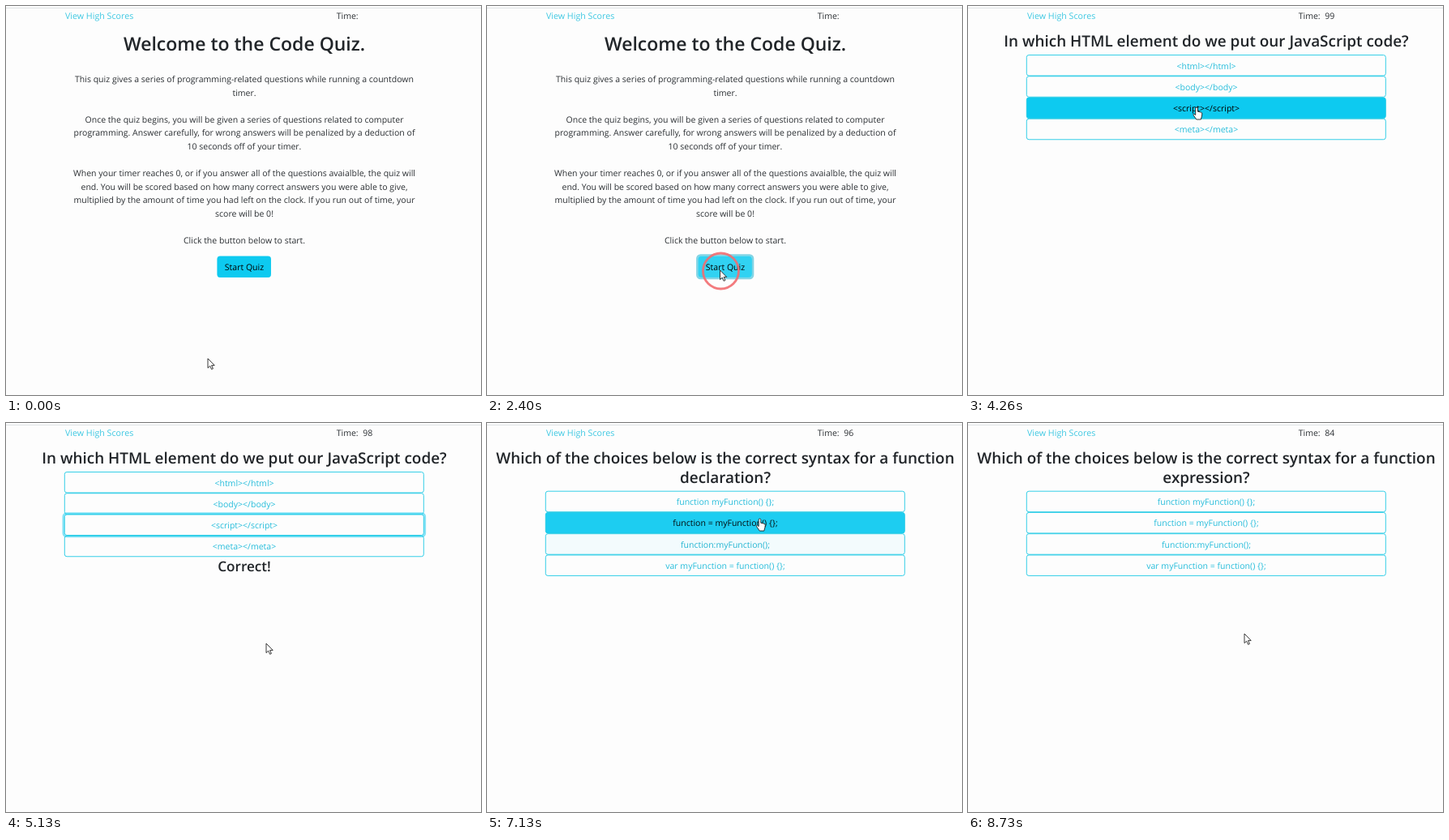
Write an HTML page that moves like this. It is 586 px wide and 480 px high and loops after 8.8 s.

```html
<!DOCTYPE html>
<html lang="en">
<head>
<meta charset="utf-8">
<title>Code Quiz</title>
<style>
  html, body { margin: 0; width: 100%; height: 100%; overflow: hidden; background: #fdfdfd; }
  svg { display: block; width: 586px; height: 480px; }
  text {
    font: 10.53px "Open Sans", "Noto Sans", sans-serif;
    fill: #2b2f33; text-anchor: middle; text-rendering: geometricPrecision;
  }
  .left { text-anchor: start; }
  .link { fill: #3fc8e2; font-size: 10.7px; }
  .title, .question, .result { font-weight: 600; fill: #212529; }
  .title { font-size: 23px; }
  .question { font-size: 18.93px; }
  .result { font-size: 17.1px; }
  .box { fill: #0dcaf0; stroke: #1fcae6; stroke-width: .9; }
  .ring { fill: none; stroke: #0dcaf0; stroke-opacity: .5; stroke-width: 2.6; }
  .cursor path { fill: #fff; stroke: #222; stroke-width: .9; stroke-linejoin: round; }
</style>
</head>
<body>
<svg id="stage" viewBox="0 0 586 480"></svg>
<script>
const LOOP = 8800, CENTER = 294, LINE = 16.6, ROW = 26.25, HEADING_LINE = 23.7, FADE = 150;
const START_AT = 2450, PENALTY_AT = 7530;

const intro = [
  [0, 'This quiz gives a series of programming-related questions while running a countdown'],
  [1, 'timer.'],
  [3, 'Once the quiz begins, you will be given a series of questions related to computer'],
  [4, 'programming. Answer carefully, for wrong answers will be penalized by a deduction of'],
  [5, '10 seconds off of your timer.'],
  [7, 'When your timer reaches 0, or if you answer all of the questions avaialble, the quiz will'],
  [8, 'end. You will be scored based on how many correct answers you were able to give,'],
  [9, 'multiplied by the amount of time you had left on the clock. If you run out of time, your'],
  [10, 'score will be 0!'],
  [12, 'Click the button below to start.'],
];

const syntaxChoices = ['function myFunction() {};', 'function = myFunction() {};',
  'function:myFunction();', 'var myFunction = function() {};'];
const syntaxHeading = 'Which of the choices below is the correct syntax for a function';

// hovers: [row, enter, leave]; focus: [row, time]; result: [text, time]
const questions = [
  { from: START_AT, to: 5400,
    heading: ['In which HTML element do we put our JavaScript code?'],
    choices: ['html', 'body', 'script', 'meta'].map(tag => `<${tag}></${tag}>`),
    hovers: [[3, 3198, 3288], [2, 3288, 4542], [3, 4542, 4600]],
    focus: [2, 4350], result: ['Correct!', 4400] },
  { from: 5400, to: 8530,
    heading: [syntaxHeading, 'declaration?'], choices: syntaxChoices,
    hovers: [[3, 6850, 6920], [2, 6920, 7005], [1, 7005, 8473], [2, 8473, 8522]],
    focus: [1, 7470], result: ['Incorrect!', PENALTY_AT] },
  { from: 8530, to: LOOP,
    heading: [syntaxHeading, 'expression?'], choices: syntaxChoices,
    hovers: [[3, 8530, 8565]] },
];

// Cursor moves: start, end, destination
const origin = [249, 435];
const moves = [
  [60, 930, [292, 321]],
  [1860, 2250, [287.5, 326]],
  [2750, 3400, [282, 125]],
  [4470, 4850, [321, 272]],
  [6530, 7140, [336.5, 118]],
  [8400, 8700, [341, 260]],
];
const handTimes = [[745, 2380], [3200, 4600], [6850, 8560]];
const clicks = [2330, 4350, 7470];

const stage = document.getElementById('stage');
const escape = s => s.replace(/&/g, '&amp;').replace(/</g, '&lt;');
const text = (s, x, y, cls = '') => `<text class="${cls}" x="${x}" y="${y}">${escape(s)}</text>`;
const rect = (cls, x, y, w, h, r) =>
  `<rect class="${cls}" x="${x}" y="${y}" width="${w}" height="${h}" rx="${r}"/>`;

function button(x, y, w, label, cls) {
  return `<g class="${cls}">${rect('ring', x - 1.5, y - 1.5, w + 3, 28.5, 4)}` +
    `${rect('box', x, y, w, 25.5, 2.8)}${text(label, CENTER, y + 17)}</g>`;
}

function questionMarkup({ heading, choices, result }) {
  const shift = HEADING_LINE * (heading.length - 1);
  return `<g class="quiz">
    ${heading.map((s, i) => text(s, CENTER, 50 + i * HEADING_LINE, 'question')).join('')}
    <g transform="translate(0 ${shift})">
      ${choices.map((s, i) => button(72.3, 60.5 + i * ROW, 443, s, 'choice')).join('')}
      ${result ? text(result[0], CENTER, 183, 'result') : ''}
    </g></g>`;
}

stage.innerHTML = `
  <rect width="586" height="480" fill="#fdfdfd"/>
  <rect y="2" width="586" height="1" fill="#dee2e5"/>
  ${text('View High Scores', 72.9, 15.5, 'left link')}
  ${text('Time:', 407.7, 15.5, 'left')}${text('', 440.3, 15.5, 'left clock')}
  <g class="welcome">
    ${text('Welcome to the Code Quiz.', CENTER, 54.5, 'title')}
    ${intro.map(([line, s]) => text(s, CENTER, 94 + line * LINE)).join('')}
    ${button(260.9, 309, 65.6, 'Start Quiz', 'start')}
  </g>
  ${questions.map(questionMarkup).join('')}
  <circle class="click" r="22" fill="none" stroke="#f26d70" stroke-opacity=".9" stroke-width="2.8"/>
  <g class="cursor">
    <path class="arrow" d="M0 0V11.6L2.7 9.1 4.6 13.3 6.4 12.5 4.6 8.4H8.2Z"/>
    <path class="hand" d="M-1.3 1.2Q-1.3 0 0 0T1.3 1.2V5.2L5.4 6.1Q6.9 6.5 6.8 8L6.4 11 5.3 15H-.2L-3.8 9.8Q-4.5 8.2-3.2 8L-1.3 9.5Z"/>
  </g>`;

const find = cls => stage.querySelector('.' + cls);
const show = (el, on) => { el.style.display = on ? '' : 'none'; };
const between = (t, from, to) => t >= from && t < to;
const ease = x => { x = Math.min(1, Math.max(0, x)); return x * x * (3 - 2 * x); };

const [clock, welcome, start, clickRing, cursor, arrow, hand] =
  ['clock', 'welcome', 'start', 'click', 'cursor', 'arrow', 'hand'].map(find);
const quizzes = [...stage.querySelectorAll('.quiz')].map(el => ({
  el, rows: [...el.querySelectorAll('.choice')], result: el.querySelector('.result'),
}));

function cursorAt(t) {
  let [x, y] = origin;
  for (const [from, to, [endX, endY]] of moves) {
    const k = ease((t - from) / (to - from));
    x += (endX - x) * k;
    y += (endY - y) * k;
  }
  return [x, y];
}

const hoverLevel = (t, enter, leave) =>
  ease((Math.min(t, leave) - enter) / FADE) * (1 - ease((t - leave) / FADE));

function drawStart(t) {
  const [ring, box, label] = start.children;
  const level = ease((t - 745) / FADE);
  show(ring, t >= clicks[0]);
  ring.style.stroke = '#0baccc';
  box.style.fill = box.style.stroke = `color-mix(in srgb, #31d2f2 ${level * 100}%, #0dcaf0)`;
  label.style.fill = '#000';
}

function drawQuestion({ hovers, focus, result }, view, t) {
  view.rows.forEach((row, i) => {
    const [ring, box, label] = row.children;
    const level = Math.max(0, ...hovers.filter(h => h[0] === i).map(h => hoverLevel(t, h[1], h[2])));
    show(ring, focus && focus[0] === i && t >= focus[1]);
    box.style.fillOpacity = level;
    label.style.fill = `color-mix(in srgb, #000 ${level * 100}%, #26bddb)`;
  });
  if (result) show(view.result, t >= result[1]);
}

function draw(t) {
  show(welcome, t < START_AT);
  if (t < START_AT) drawStart(t);
  questions.forEach((question, i) => {
    const active = between(t, question.from, question.to);
    show(quizzes[i].el, active);
    if (active) drawQuestion(question, quizzes[i], t);
  });

  const seconds = Math.floor((t - START_AT) / 1000);
  clock.textContent = t < START_AT ? '' : 100 - seconds - (t >= PENALTY_AT ? 10 : 0);

  const [x, y] = cursorAt(t);
  const pointing = handTimes.some(([from, to]) => between(t, from, to));
  cursor.setAttribute('transform', `translate(${x} ${y})`);
  show(arrow, !pointing);
  show(hand, pointing);
  clickRing.setAttribute('cx', x + 1);
  clickRing.setAttribute('cy', y + 1);
  show(clickRing, clicks.some(at => between(t, at, at + 200)));
}

const startTime = performance.now();
function frame() {
  draw((performance.now() - startTime) % LOOP);
  requestAnimationFrame(frame);
}
frame();
</script>
</body>
</html>
```
